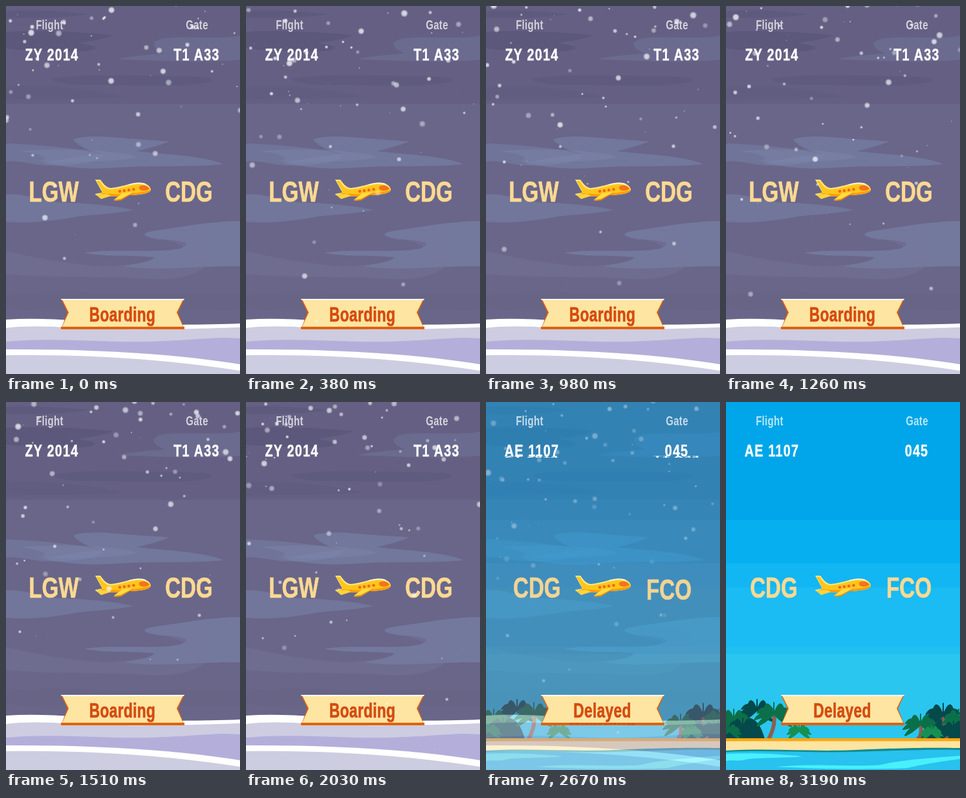
An HTML page with a canvas for the animation above (4390 ms loop, 362x568 px).

```html
<!DOCTYPE html>
<html lang="en">
<head>
<meta charset="utf-8">
<title>Flight board</title>
<style>
  html, body { margin: 0; width: 100%; height: 100%; overflow: hidden; background: #6a6689; }
  svg, canvas { position: absolute; left: 0; top: 0; width: 362px; height: 568px; }
  text { font-family: "Liberation Sans", Arial, sans-serif; font-weight: bold; text-anchor: middle; }
  .caption { font-size: 20px; fill: #fff; opacity: .72; letter-spacing: .5px; }
  .number { font-size: 26.5px; fill: #fff; stroke: #fff; stroke-width: .5px; letter-spacing: 1.7px; }
  .airport { font-size: 44.5px; fill: #fdd992; stroke: #fdd992; stroke-width: .7px; }
  .status { font-size: 30.5px; fill: #d54b10; stroke: #d54b10; stroke-width: .7px; letter-spacing: .5px; }
</style>
</head>
<body>
<svg viewBox="0 0 362 568">
  <g id="winter">
    <path fill="#6a6689" d="M0 0H362V568H0Z"/>
    <path fill="#656083" d="M0 0H362V151H0Z"/>
    <g fill="#5b577a">
      <path d="M0 40C50 37 120 40 166 45C150 52 130 54 112 57C140 62 150 66 120 70C80 72 30 68 0 66Z" opacity=".8"/>
      <path d="M70 112C120 104 200 108 300 109C330 111 322 119 285 122C230 124 160 122 120 122C95 122 75 118 70 112Z" opacity=".5"/>
      <path d="M0 8C40 4 90 9 130 12C100 18 40 20 0 18Z" opacity=".6"/>
      <path d="M0 124C60 120 130 128 180 140C110 146 50 142 0 145Z" opacity=".4"/>
    </g>
    <g fill="#7885ab">
      <path opacity=".3" d="M172 82C195 77 225 75 246 73C228 67 222 57 238 51C275 44 325 53 362 46V83C300 88 230 84 172 82Z"/>
      <path opacity=".55" d="M104 206C126 198 165 203 196 205L252 209C236 216 215 221 202 224C245 229 310 232 336 244C300 249 220 246 178 249C120 254 84 247 57 242C90 236 128 230 150 228C126 224 112 216 104 206Z"/>
      <path opacity=".45" d="M0 212C55 214 115 220 150 229C155 238 110 248 60 246C35 244 20 238 0 240Z"/>
      <path opacity=".5" d="M0 291C25 288 48 299 82 303C120 304 170 308 197 315C165 322 130 321 100 327C65 332 40 336 0 333Z"/>
      <path opacity=".6" d="M362 332C318 332 280 340 235 346C205 350 210 356 236 360C275 362 290 366 270 374C240 382 165 374 121 381C160 388 200 384 230 388C220 397 195 398 183 402C240 410 310 400 362 402Z"/>
    </g>
    <path fill="#8089ac" opacity=".35" d="M22 224C80 218 165 222 203 232C190 241 90 242 50 240C75 234 50 228 22 224Z"/>
    <path fill="#77759a" opacity=".35" d="M235 346C300 342 325 356 320 380C315 414 268 425 215 421C150 417 70 420 0 414V378C50 390 90 397 150 402C205 399 260 390 285 382C280 372 262 362 235 360Z"/>
    <path fill="#65617f" opacity=".3" d="M0 447C60 440 110 441 180 446C250 443 300 444 362 444V470C240 463 90 480 0 465Z"/>
    <path fill="#fff" d="M0 484C60 480 120 487 180 490S320 492 362 490V568H0Z"/>
    <path fill="#cdcce1" d="M0 497C50 491 100 498 180 499S320 497 362 496V568H0Z"/>
    <path fill="#b3afda" d="M0 518C80 511 150 520 220 518S320 510 362 513V568H0Z"/>
    <path fill="#fff" d="M0 530C120 529 260 536 362 553V568H0Z"/>
    <path fill="#cdcde1" d="M0 539C120 537 250 545 362 563V568H0Z"/>
  </g>
  <g id="beach">
    <path fill="#00a6e9" d="M0 0H362V568H0Z"/>
    <path fill="#06b0f0" d="M0 182H362V568H0Z"/>
    <path fill="#12b6f2" d="M0 249H362V568H0Z"/>
    <path fill="#1bbbf3" d="M0 286H362V568H0Z"/>
    <path fill="#20bff2" d="M0 377H362V568H0Z"/>
    <path fill="#2ac6f0" d="M0 389H362V568H0Z"/>
    <g id="palms"></g>
    <path fill="#fca812" d="M0 519H362V540H0Z"/>
    <path fill="#fde4a1" d="M0 523.5H362V545H0Z"/>
    <path fill="#138b8b" d="M0 538C70 534 130 540 200 537S310 533 362 534V568H0Z"/>
    <path fill="#29c1ee" d="M0 540C70 537 130 542 200 540S310 536 362 537V568H0Z"/>
    <path fill="#48f0fb" d="M0 543C45 541 90 544 118 547C95 550 50 548 30 552C18 555 8 552 0 554Z"/>
    <path fill="#48f0fb" d="M78 563C150 557 190 564 240 560C270 552 325 549 362 546V551C325 556 300 560 280 565C215 568 135 566 78 563Z"/>
  </g>
  <g id="plane">
    <path fill="#ffe68a" d="M138 268L146 268C151 275 155 280 162 281C178 280 190 273 207 273C217 273 224 278 224 284C223 290 203 292 190 292C174 294 158 294 148 294L139 292L138 290L149 288Z"/>
    <path fill="#ffc61a" d="M140 270L145 270C150 278 155 283 162 283C179 282 192 275 207 275C217 276 223 280 224 284C221 290 203 291 190 292C174 294 158 294 149 293L143 291L150 288Z"/>
    <path fill="#ff9b0c" d="M150 289C175 292 202 290 224 284C222 290 203 292 190 292C174 294 158 294 148 294L140 292Z"/>
    <path fill="#ffd33a" d="M139 291L156 290L163 293L147 298Z"/>
    <path fill="#f58a0c" d="M198 288L178 300L168 301L167 299L181 289Z"/>
    <path fill="#ffdd45" d="M198 287L177 298L167 299L180 289Z"/>
    <path fill="#f4731b" d="M206 279C211 275 219 277 222 282C217 286 208 286 206 282Z"/>
    <g fill="#ee6a1e"><circle cx="176" cy="286" r="2.3"/><circle cx="183" cy="285" r="2.3"/><circle cx="190" cy="284" r="2.3"/><circle cx="197.500" cy="283" r="2.3"/></g>
    <path fill="none" stroke="#fff8db" stroke-width="1.5" d="M190 276C198 273 210 272 216 275"/>
  </g>
  <g id="banner">
    <path fill="#e0620e" d="M85 452H276L266 473L276 499H85L95 473Z"/>
    <path fill="#fee5a1" d="M87 453H274L264 473L274 495H87L97 473Z"/>
    <path fill="#fff" d="M85 452H276L275 454H86Z"/>
    <path fill="#e0620e" d="M85 495H276V499H85Z"/>
  </g>
  <g id="labels"></g>
</svg>
<canvas id="snow"></canvas>
<script>
const LOOP = 4390, SWITCH = 2180, FADE = 1000, MOVE = 500, LEAVE = 450;
const WIDTH = 362, HEIGHT = 568;
const CONDENSE = 0.745;   // one narrow face for all text
const byId = id => document.getElementById(id);
const clamp = v => Math.min(1, Math.max(0, v));
const mix = (a, b, k) => a + (b - a) * k;

function make(parent, tag, attrs, content = '') {
  const node = document.createElementNS('http://www.w3.org/2000/svg', tag);
  for (const key in attrs) node.setAttribute(key, attrs[key]);
  node.textContent = content;
  return parent.appendChild(node);
}

function bezierEase(x1, y1, x2, y2) {
  const curve = (a, b, s) => 3 * a * s * (1 - s) ** 2 + 3 * b * s * s * (1 - s) + s ** 3;
  return value => {
    const x = clamp(value);
    let low = 0, high = 1;
    for (let i = 0; i < 24; i++) {
      const mid = (low + high) / 2;
      if (curve(x1, x2, mid) < x) low = mid; else high = mid;
    }
    return curve(y1, y2, high);
  };
}
const easeIn = bezierEase(.42, 0, 1, 1);
const easeOut = bezierEase(0, 0, .58, 1);
const easeInOut = bezierEase(.42, 0, .58, 1);

function seeded(seed) {
  return () => (seed = seed * 16807 % 2147483647) / 2147483647;
}

// Palms: crown position, frond length, colour, optional foot of the trunk
function palm(x, y, size, color, footX) {
  const group = byId('palms');
  if (footX) make(group, 'path', {
    d: `M${x} ${y}Q${x + 3} ${y + 18} ${footX} 520`, fill: 'none', stroke: '#8b5f4d', 'stroke-width': 6
  });
  let d = '';
  for (let i = 0; i < 9; i++) {
    const angle = Math.PI * (i / 8 * 1.3 - .15);
    const ex = size * Math.cos(angle), ey = size * (.3 - .7 * Math.sin(angle));
    d += `M${x} ${y}q${ex * .65} ${ey - size * .55} ${ex} ${ey}q${-ex * .4} ${-size * .1} ${-ex} ${-ey}`;
  }
  make(group, 'path', { d, fill: color, stroke: color, 'stroke-width': 2, 'stroke-linejoin': 'round' });
}
const DARK = '#05494a', GREEN = '#0b7049', BRIGHT = '#169052';
make(byId('palms'), 'path', {
  fill: DARK, d: 'M0 520V492Q12 480 30 488Q50 484 60 520ZM300 520Q312 494 324 496Q338 480 362 488V520Z'
});
palm(48, 476, 28, DARK);
palm(12, 490, 26, GREEN);
palm(74, 482, 30, GREEN, 66);
palm(26, 503, 25, DARK);
palm(113, 508, 18, BRIGHT);
palm(5, 508, 18, GREEN);
palm(336, 484, 31, DARK, 341);
palm(360, 490, 26, GREEN);
palm(301, 498, 27, GREEN, 296);
palm(352, 506, 22, DARK);
palm(318, 511, 17, BRIGHT);

// Labels are centred on (x, y), the middle of the capitals
function label(style, x, y, content) {
  const node = make(byId('labels'), 'text', { class: style, dy: '.35em' }, content);
  return {
    pose(dx, dy, scaleY, opacity) {
      node.setAttribute('transform', `translate(${x + dx} ${y + dy}) scale(${CONDENSE} ${scaleY})`);
      node.style.opacity = opacity;
    }
  };
}
const pair = (style, x, y, before, after) =>
  [label(style, x, y, before), label(style, x, y, after)];

label('caption', 67.500, 28.500, 'Flight').pose(0, 0, 1, '');
label('caption', 295.500, 28.500, 'Gate').pose(0, 0, 1, '');

const cubes = [
  { labels: pair('number', 71, 74.500, 'ZY 2014', 'AE 1107'), offset: 10.5 },
  { labels: pair('number', 295, 74.500, 'T1 A33', '045'), offset: 10.5 },
  { labels: pair('status', 180, 476, 'Boarding', 'Delayed'), offset: 21 }
];
const slides = [
  { labels: pair('airport', 74, 286.500, 'LGW', 'CDG'), dx: 80, dy: 0 },
  { labels: pair('airport', 283, 286.500, 'CDG', 'FCO'), dx: 0, dy: 50 }
];

function drawLabels(t) {
  const progress = clamp((t - SWITCH) / MOVE);
  const turn = easeOut(progress), arrive = easeIn(progress * 2 - 1);
  const leave = easeIn((t - SWITCH) / LEAVE);
  for (const { labels: [before, after], offset } of cubes) {
    before.pose(0, offset * turn, mix(1, .1, turn), progress < 1 ? 1 : 0);
    after.pose(0, offset * (turn - 1), mix(.1, 1, turn), progress > 0 ? 1 : 0);
  }
  for (const { labels: [before, after], dx, dy } of slides) {
    before.pose(dx * leave, dy * leave, 1, 1 - leave);
    after.pose(dx * (1 - arrive), dy * (1 - arrive), 1, arrive);
  }
}

// Snow: flakes born above the stage, mostly at the left, pulled down and right
const random = seeded(2024);
const BIRTHS_PER_SECOND = 46;
const flakes = Array.from({ length: 7.7 * BIRTHS_PER_SECOND | 0 }, (_, i) => {
  const speed = mix(-60, 110, random());
  const angle = Math.PI * mix(-.25, .25, random());
  return {
    birth: -4.5 + i / BIRTHS_PER_SECOND, life: mix(2.5, 4.5, random()),
    x: mix(-130, 330, random() ** 1.3), y: mix(-70, -20, random()),
    vx: speed * Math.cos(angle), vy: speed * Math.sin(angle),
    scale: mix(.2, 1.3, random()), alpha: mix(.6, 1.2, random())
  };
});
const canvas = byId('snow'), ctx = canvas.getContext('2d');
const ratio = window.devicePixelRatio || 1;
canvas.width = WIDTH * ratio;
canvas.height = HEIGHT * ratio;
ctx.scale(ratio, ratio);
ctx.fillStyle = '#f6f8ff';

function drawSnow(seconds) {
  ctx.clearRect(0, 0, WIDTH, HEIGHT);
  for (const f of flakes) {
    const age = seconds - f.birth;
    const radius = 4.8 * (f.scale - .09 * age), alpha = clamp(f.alpha - .13 * age);
    if (age < 0 || age > f.life || radius <= 0) continue;
    const x = f.x + f.vx * age + 5 * age * age;
    const y = f.y + f.vy * age + 35 * age * age;
    for (const [size, strength] of [[1, .35], [.8, .4], [.6, .5]]) {
      ctx.globalAlpha = alpha * strength;
      ctx.beginPath();
      ctx.arc(x, y, radius * size, 0, 2 * Math.PI);
      ctx.fill();
    }
  }
}

const start = performance.now();
function frame() {
  const t = (performance.now() - start) % LOOP;
  const fade = easeInOut((t - SWITCH) / FADE);
  byId('beach').style.opacity = fade;
  canvas.style.opacity = 1 - fade;
  drawLabels(t);
  drawSnow(t / 1000);
  requestAnimationFrame(frame);
}
frame();
</script>
</body>
</html>
```
